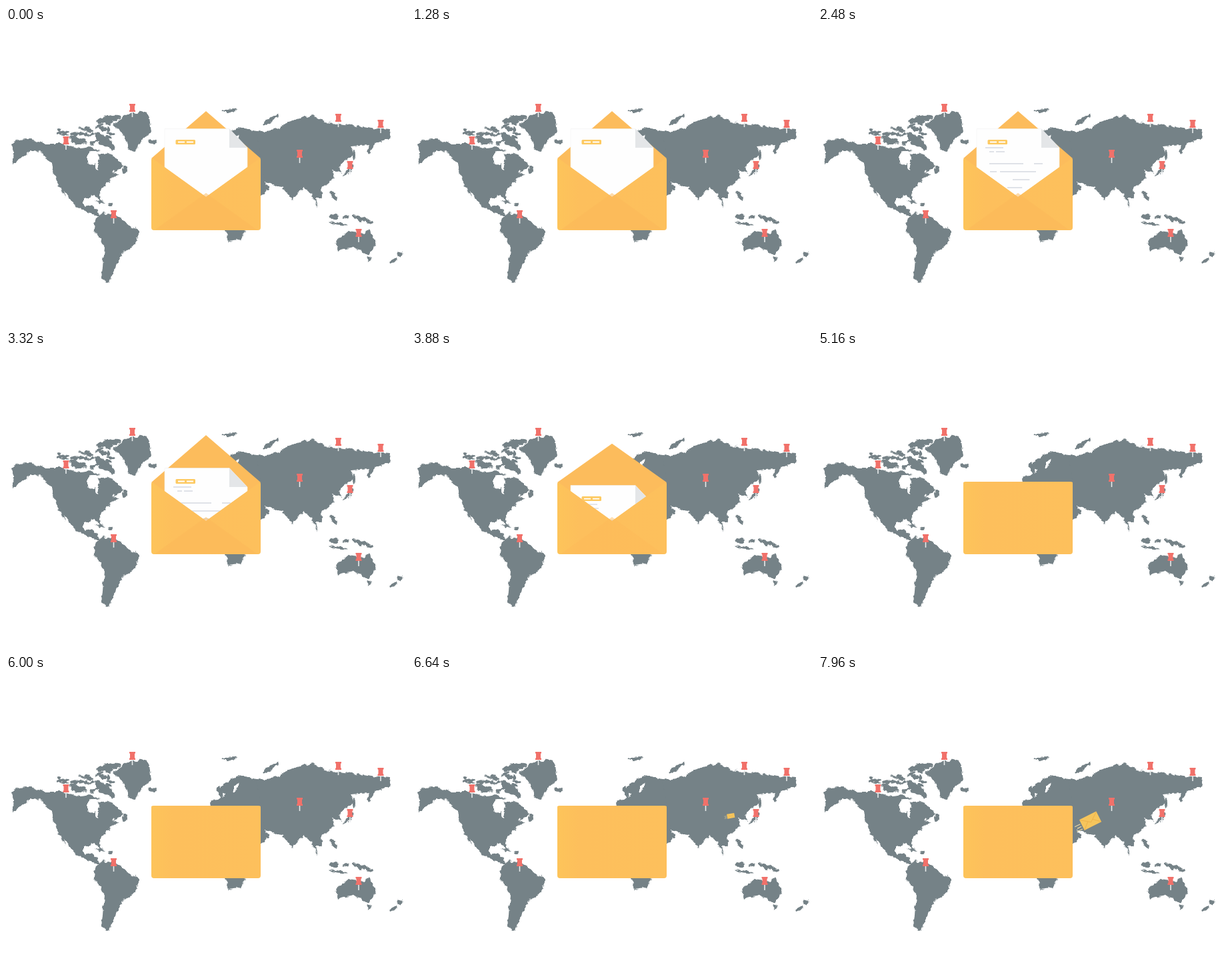
An HTML page for the animation above (8 s loop, 600 by 445 pixels).

```html
<!DOCTYPE html>
<html lang="en">
<head>
<meta charset="utf-8">
<title>Mail around the world</title>
<style>
  html, body { margin: 0; width: 100%; height: 100%; overflow: hidden; background: #fff; }
  svg { display: block; width: 100%; height: 100%; }
</style>
</head>
<body>
<svg viewBox="0 0 600 445">
  <defs>
    <filter id="coast" x="0" y="0" width="600" height="445" filterUnits="userSpaceOnUse" color-interpolation-filters="sRGB">
      <feTurbulence type="fractalNoise" baseFrequency=".14" numOctaves="2" seed="4"/>
      <feDisplacementMap in="SourceGraphic" scale="7" xChannelSelector="R" yChannelSelector="G"/>
    </filter>
    <linearGradient id="face">
      <stop offset="0" stop-color="#fdc45a"/>
      <stop offset=".2" stop-color="#fdbf5c"/>
      <stop offset="1" stop-color="#fdc05c"/>
    </linearGradient>
    <clipPath id="opening"><path d="M218 0H382V195L300 254 218 195z"/></clipPath>
    <path id="pin" d="M-4.500 0h9v2l-1 1v6l1 1v2h-9v-2l1-1v-6l-1-1z"/>
  </defs>

  <g id="map" fill="#758287" filter="url(#coast)"></g>

  <g id="flyer">
    <path d="M-88-8H-56M-80 6H-56M-90 20H-56" stroke="#ecd9a6" stroke-width="4"/>
    <rect x="-50" y="-31" width="100" height="62" rx="3" fill="#f6c55c"/>
    <path d="M-50-30L0 8 50-30M-50 30L-14-2M50 30L14-2" fill="none" stroke="#eeb04a" stroke-width="3"/>
  </g>

  <path id="backFlap" fill="#fcbc5c"/>
  <g clip-path="url(#opening)">
    <g id="paper">
      <path d="M238 151.500H335L362 180V262H238z" fill="#fefefe" stroke="#f1f2f3" stroke-width=".6"/>
      <path d="M335 151.500V180H362z" fill="#e4e6e8"/>
      <rect x="254.500" y="168" width="29.500" height="7" rx="1.500" fill="#fdca62"/>
      <path d="M258 171.500H268M271 171.500H281" stroke="#fff" stroke-width="1.800"/>
      <g id="writing" stroke="#d5d8e0" stroke-width="1.300"></g>
    </g>
  </g>
  <path d="M218 198Q218 195 221 197L300 254 379 197Q382 195 382 198V300a4 4 0 0 1-4 4H222a4 4 0 0 1-4-4z" fill="url(#face)"/>
  <path id="bottomFlap" d="M224 303L300 248 376 303z" fill="#fcb858" opacity=".5"/>
  <path id="frontFlap" fill="url(#face)"/>
  <g id="pins"></g>
</svg>

<script>
const LOOP = 8000, STEP = 40;
const byId = id => document.getElementById(id);
const clamp = v => Math.max(0, Math.min(1, v));
const mix = (a, b, p) => a + (b - a) * p;

let seed = 11;
const random = () => (seed = seed * 16807 % 2147483647) / 2147483647;

function add(parent, tag, attributes) {
  const node = document.createElementNS('http://www.w3.org/2000/svg', tag);
  for (const key in attributes) node.setAttribute(key, attributes[key]);
  return byId(parent).appendChild(node);
}

const land = outline => add('map', 'path', { d: `M${outline}z` });
const blob = (x, y, rx, ry = rx, tilt = 0, more = {}) =>
  add('map', 'ellipse', { rx, ry, transform: `translate(${x} ${y}) rotate(${tilt})`, ...more });
const sea = (...shape) => blob(...shape, { fill: '#fff' });

// Rough outlines; the coast filter adds the bays and capes
function drawMap() {
  // North America
  land('8 175L16 168 33 167 60 174 82 174 112 181 128 179 153 189 163 193 176 208 160 217 170 221 157 227 139 247 142 261 133 252 117 256 117 269 130 266 138 277 146 284 132 281 104 268 87 243 90 255 75 229 67 204 52 185 38 184 10 206 12 186');
  sea(131, 195, 9, 11, 0);
  sea(137, 207, 3, 7, 0);
  sea(144, 187, 9, 3, 0);
  // Greenland
  land('160 146L178 131 206 125 215 134 218 156 203 169 194 187 183 181 177 160');
  // South America
  land('134 287L146 278 170 283 184 296 201 305 193 325 174 338 158 371 155 384 143 377 148 330 132 303');
  // Europe and Africa
  land('304 198L308 187 318 186 330 177 323 172 323 165 348 149 364 152 400 157 400 233 388 232 396 240 388 250 360 257 359 304 352 318 334 321 328 300');
  sea(345, 168, 2.5, 9, 25);
  // Asia
  land('376 158L407 152 424 141 460 130 478 142 520 146 548 151 577 153 575 167 553 174 546 190 541 186 546 176 516 178 522 188 501 206 503 218 489 214 492 226 472 242 475 256 464 256 467 270 457 248 446 240 430 258 414 240 390 232');
  // Australia
  land('495 320L514 304 538 311 543 302 556 320 545 341 520 330 499 335');

  const islands = [
    [148, 170, 19, 6, 38], [154, 137, 19, 5, -12], [106, 170, 10, 5, 10],
    [220, 171, 7, 3], [141, 261, 8, 1.5, 18], [156, 265, 4, 2], [178, 213, 4, 5],
    [321, 174, 4, 8, -15], [335, 124, 11, 2.5, -10], [397, 138, 14, 3, -35],
    [522, 192, 2, 8], [514, 214, 11, 3, -50], [491, 251, 3, 9, -25],
    [492, 284, 7, 4], [498, 294, 14, 1.6, 8], [510, 285, 4, 3], [536, 288, 17, 3.5, 20],
    [545, 347, 3], [590, 339, 3, 5, -30], [581, 350, 7, 2.5, -40]
  ];
  islands.forEach(shape => blob(...shape));

  // Arctic archipelago, widening to the east
  for (let i = 0; i < 34; i++) {
    const east = random() * 80;
    const y = mix(152 - east * 0.2, 167 + east * 0.14, random());
    blob(80 + east, y, 3 + random() * 4, 1.5 + random() * 1.5, mix(-25, 25, random()));
  }
}
drawMap();

const pins = {
  north: [189.5, 114], west: [90, 163], arctic: [498.5, 129], east: [562, 138],
  centre: [440.5, 183], japan: [516, 200], australia: [529, 302], south: [161.5, 274]
};
for (const [x, y] of Object.values(pins)) {
  add('pins', 'path', { d: `M${x} ${y + 12}v8`, stroke: '#e8ebec', 'stroke-width': 1.6 });
  add('pins', 'use', { href: '#pin', x, y, fill: '#f1716a' });
}

// Written strokes: start x, end x, y
const strokes = [
  [251, 278, 180], [257, 264, 186], [267, 280, 186],
  [257, 308, 204], [324, 337, 204], [258, 268, 216],
  [273, 327, 216], [292, 321, 228], [284, 321, 240]
].map(([x1, x2, y], i) => ({
  x1, x2, start: 1920 + i * 55,
  node: add('writing', 'line', { x1, x2: x1, y1: y, y2: y })
}));

// Each small letter leaves from behind the big one and shrinks towards a pin
const flights = [
  { start: 4480, fromY: 265, pin: pins.australia },
  { start: 5320, fromY: 211, pin: pins.centre },
  { start: 6120, fromY: 231, pin: pins.japan },
  { start: 6920, fromY: 213, pin: pins.arctic },
  { start: 7800, fromY: 241, pin: pins.east }
];
const FLIGHT = 680, FROM_X = 362;

function drawFlyer(t) {
  const flight = flights.find(f => t >= f.start && t < f.start + FLIGHT);
  byId('flyer').style.display = flight ? '' : 'none';
  if (!flight) return;
  const p = (t - flight.start) / FLIGHT;
  const toX = flight.pin[0] - 2, toY = flight.pin[1] + 4;
  const angle = Math.atan2(toY - flight.fromY, toX - FROM_X) * 180 / Math.PI;
  const x = mix(FROM_X, toX, p), y = mix(flight.fromY, toY, p);
  byId('flyer').setAttribute('transform', `translate(${x} ${y}) rotate(${angle}) scale(${0.36 * (1 - 0.9 * p)})`);
}

function drawEnvelope(t) {
  for (const s of strokes) {
    const p = clamp((t - s.start) / 200);
    s.node.setAttribute('x2', mix(s.x1, s.x2, p));
    s.node.style.display = p ? '' : 'none';
  }
  const slide = Math.max(0, t - 2760);
  byId('paper').setAttribute('transform', `translate(0 ${slide * 0.0384 + slide * slide * 4.8e-6})`);

  const p = clamp((t - 3760) / 560);
  const fold = p < 0.5 ? 2 * p * p : 1 - 2 * (1 - p) ** 2;
  const tip = mix(125, 265, fold);
  const closing = tip > 195;
  byId('backFlap').setAttribute('d', `M218 196L300 ${Math.min(tip, 195)} 382 196 300 255z`);
  byId('frontFlap').setAttribute('d', closing ? `M221 195H379Q382 195 382 197L300 ${tip} 218 197Q218 195 221 195z` : '');
  byId('bottomFlap').setAttribute('opacity', 0.5 * (1 - fold));
}

function frame() {
  const t = Math.floor(performance.now() % LOOP / STEP) * STEP;
  drawEnvelope(t);
  drawFlyer(t);
  requestAnimationFrame(frame);
}
frame();
</script>
</body>
</html>
```
